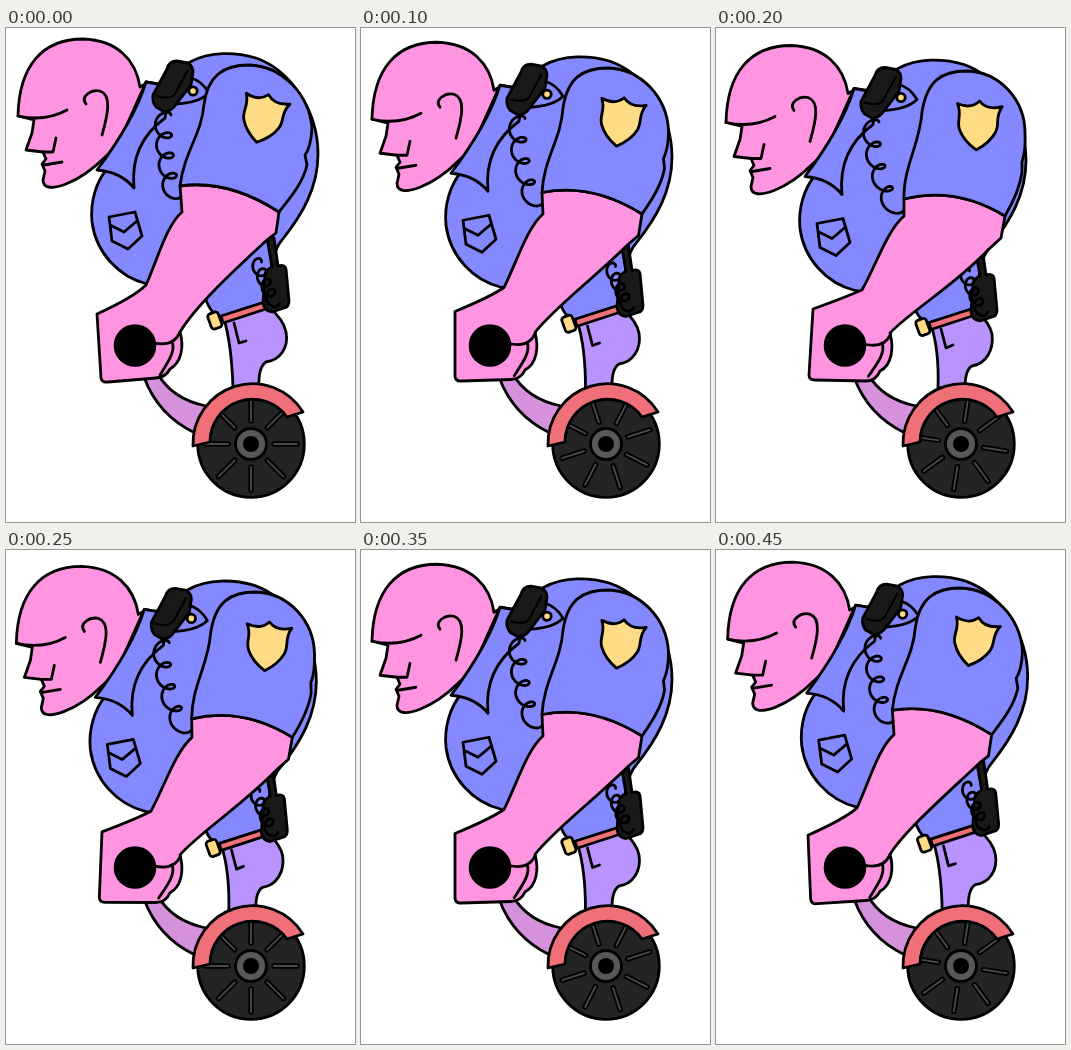
An HTML page that plays this animation: 349 by 494 pixels, repeating every 0.5 s.

```html
<!DOCTYPE html>
<html lang="en">
<head>
<meta charset="utf-8">
<title>Officer on wheels</title>
<style>
html, body { margin: 0; width: 100%; height: 100%; overflow: hidden; background: #fff; }
svg { display: block; width: 100vw; height: 100vh; }
.ink { stroke: #000; stroke-width: 2.8; stroke-linejoin: round; stroke-linecap: round; }
.line { fill: none; }
.skin { fill: #ff95e1; }
.shirt { fill: #8589ff; }
.red { fill: #f0707a; }
.gold { fill: #ffdb85; }
.leg { fill: #b994ff; }
.pole { fill: #d691dc; }
.gear { fill: #191919; }
</style>
</head>
<body>
<svg viewBox="0 0 349 494">
  <path class="ink pole" d="M138 349C146 371 160 391 189 405L200 378C176 373 161 362 152 346Z"/>
  <path id="leg" class="ink leg"/>
  <path id="crease" class="ink line"/>

  <g id="wheel">
    <circle class="ink" cx="245" cy="416" r="53.3" fill="#242424"/>
    <g id="spokes"></g>
    <circle class="ink" cx="245" cy="416" r="15.5" fill="#585858"/>
    <circle cx="245" cy="416" r="8" fill="#000"/>
  </g>
  <path class="ink red" d="M187 418A59.5 60 0 0 1 297 384L281 389A42.5 42.5 0 0 0 204 414Z"/>

  <g id="body">
    <path class="ink skin" d="M139 56L134 59C130 32 111 12 77 11C37 11 13 37 12 88L28 92L26 105L20 122L37 124L40 131L36 136L39 143L37 152C37 161 47 161 60 156C75 150 88 140 98 130L130 100Z"/>
    <path class="ink line" d="M12 88Q39 94 61 82M37 124L47 124L50 110M38 137L56 134M80 76C74 68 86 61 94 63C106 67 102 86 96 107"/>
    <path class="ink shirt" d="M140 54L152 56L184 34C204 23 230 24 250 30C284 42 312 82 312 126C312 160 296 187 276 212Q264 225 262 273L213 289Q203 284 198 266L141 256C113 249 90 225 86 194C84 174 90 154 101 141Z"/>
    <path class="ink shirt" d="M140 54C132 80 115 110 91 142Q115 144 128 160C126 140 129 112 159 90L165 50L152 56Z"/>
    <path class="line" stroke="#8589ff" stroke-width="4" d="M155 60L157 84"/>
    <path class="ink line" d="M103 189L129 184L136 208L122 221L106 213ZM104 197L118 204L131 193"/>
    <path class="ink shirt" d="M185 50Q196 53 203 65Q193 75 169 76Z"/>
    <circle class="ink gold" cx="187" cy="63" r="4.2"/>
    <path class="ink gear" d="M147 67L161 41Q163 33 171 33L182 35Q187 38 187 44L185 57L168 79Q162 85 157 83L150 79Q146 74 147 67Z"/>
    <path class="line" stroke="#000" stroke-width="2" d="M150 68Q164 72 169 66L182 42"/>
    <path class="ink red" d="M215 288L262 273L263 280L217 295Z"/>
    <rect class="ink gold" x="203.5" y="284.5" width="11" height="16" rx="3" transform="rotate(-20 209 293)"/>
  </g>
  <g id="holster">
    <path class="ink gear" d="M261 210Q265 207 268 210L272 238Q279 236 280 241L283 273Q283 279 278 280L266 284Q258 283 257 275L259 247Q260 241 266 239Z"/>
    <path id="cord" class="ink line"/>
  </g>

  <path id="arm" class="ink skin"/>
  <path id="sleeve" class="ink shirt"/>
  <path id="badge" class="ink gold" d="M-22-19Q-8-14 0-23Q8-14 23-19C16-8 22-2 18 7Q13 18 0 26Q-13 18-18 7C-22-2-16-8-22-19Z"/>
  <path id="coil" class="ink line"/>
  <path id="thumb" class="ink line" d="M148 315Q168 319 174 304M166 313C170 323 162 334 154 347"/>
  <circle cx="129" cy="317.5" r="21.3" fill="#000"/>
</svg>
<script>
const LOOP = 500, STEP = 50, DIP = 200;
const $ = id => document.getElementById(id);
const lerp = (a, b, p) => a + (b - a) * p;

// Path pairs: raised pose and lowered pose
const poses = {
  leg: [
    'M218 291C223 308 226 328 227 360L253 360Q252 339 260 334C274 332 283 320 280 304Q278 292 262 278Z',
    'M215 297C220 312 223 330 222 360L249 360Q249 342 256 338C270 336 278 322 276 306Q274 296 262 284Z'
  ],
  crease: [
    'M228 295L233 315L240 313',
    'M225 301L230 320L237 317'
  ],
  arm: [
    'M174 158L176 184C161 197 153 227 140 257Q128 269 91 286L95 350Q96 355 102 354L150 350Q160 349 164 341C176 334 178 318 174 304C189 279 224 246 262 211L270 205L273 184Q222 151 174 158Z',
    'M188 171L188 188C171 203 161 235 146 262Q130 269 97 281L93 347Q93 352 99 352L150 353Q160 353 164 343C176 337 178 320 174 305C196 282 238 258 273 221L285 210L289 188Q240 158 188 171Z'
  ],
  sleeve: [
    'M174 158C178 124 196 106 198 76C202 48 217 37 243 37C276 38 303 66 306 100Q305 119 299 127L301 137C297 155 284 170 273 184Q222 151 174 158Z',
    'M188 171C187 139 204 116 206 84C211 53 225 43 251 43C284 44 309 72 309 105Q310 122 306 134L306 144C304 160 296 176 289 188Q240 158 188 171Z'
  ]
};

const NUM = /-?\d+(\.\d+)?/g;
function mix([a, b], p) {
  const ends = b.match(NUM);
  let i = 0;
  return a.replace(NUM, n => lerp(+n, +ends[i++], p).toFixed(2));
}

// Looping cord; bend > 1 delays its sideways drift
function curl(x0, y0, x1, y1, turns, rx, ry, bend = 1) {
  const n = turns * 20;
  let d = '';
  for (let i = 0; i <= n; i++) {
    const u = i / n, a = -u * turns * Math.PI * 2;
    const x = lerp(x0, x1, u ** bend) + rx * Math.cos(a);
    const y = lerp(y0, y1, u) + ry * Math.sin(a);
    d += (i ? 'L' : 'M') + x.toFixed(1) + ' ' + y.toFixed(1);
  }
  return d;
}

let bars = '';
for (let a = 0; a < 360; a += 45) {
  const bar = (w, c) => `<path d="M268 416H291" stroke="${c}" stroke-width="${w}" stroke-linecap="round" transform="rotate(${a} 245 416)"/>`;
  bars += bar(5.5, '#000') + bar(1.8, '#4a4a4a');
}
$('spokes').innerHTML = bars;
$('cord').setAttribute('d', curl(250, 234, 268, 275, 4, 5.5, 6));

function draw(ms) {
  const t = Math.floor((ms % LOOP) / STEP) * STEP;
  const p = t < DIP ? t / DIP : (LOOP - t) / (LOOP - DIP);
  const move = (id, v) => $(id).setAttribute('transform', v);

  for (const id in poses) $(id).setAttribute('d', mix(poses[id], p));
  move('body', `translate(${-2 * p} ${6.5 * p})`);
  move('holster', `translate(${-2 * p} ${9 * p})`);
  move('badge', `translate(${lerp(257, 262, p)} ${lerp(89, 96, p)}) rotate(${lerp(14, 4, p)})`);
  move('thumb', `rotate(${3 * p} 129 317)`);
  move('spokes', `rotate(${-90 * t / LOOP} 245 416)`);
  $('coil').setAttribute('d', curl(lerp(157, 155, p), lerp(87, 94, p), lerp(167, 179, p), lerp(168, 183, p), 4, 8, 7, 2));
}

const start = performance.now();
function tick() {
  draw(performance.now() - start);
  requestAnimationFrame(tick);
}
tick();
</script>
</body>
</html>
```
